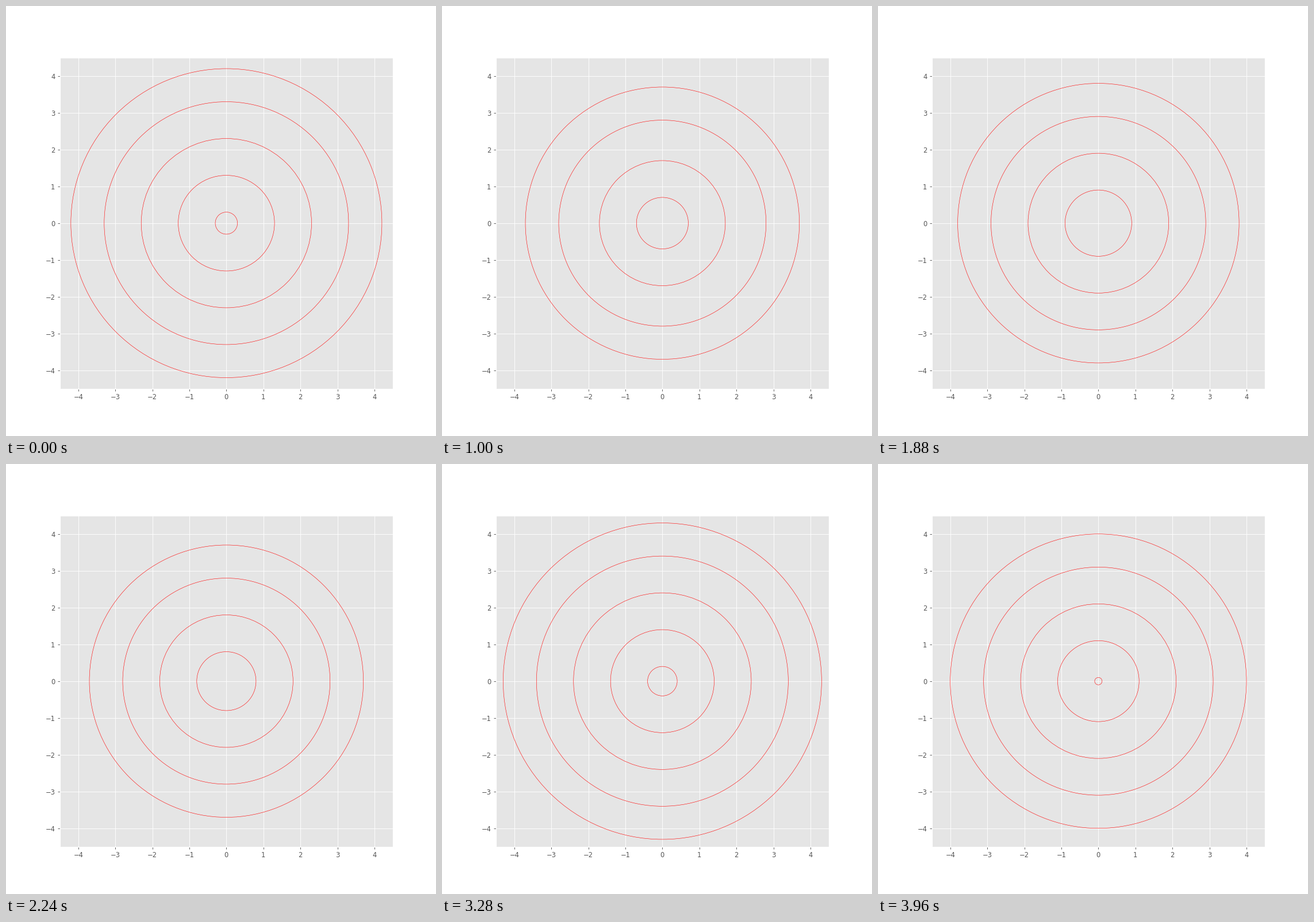
Animation, 748 px wide and 748 px high, one loop 4 s. Source, as a matplotlib script:

```python
import matplotlib.pyplot as plt
from matplotlib.animation import FuncAnimation
from matplotlib.patches import Circle

SIZE = 748
INCHES = 9
FRAMES = 100
LIMIT = 45        # largest radius, in steps of 0.1
PERIOD = 10       # frames between two new rings
LIFE = 47         # age at which a ring is dropped

plt.style.use("ggplot")
plt.rcParams["font.family"] = "DejaVu Sans"

fig = plt.figure(figsize=(INCHES, INCHES), dpi=SIZE / INCHES, facecolor="white")
ax = fig.add_axes([0.125, 0.11, 0.775, 0.77])
ax.set_xlim(-4.5, 4.5)
ax.set_ylim(-4.5, 4.5)
ax.set_xticks(range(-4, 5))
ax.set_yticks(range(-4, 5))

rings = [Circle((0, 0), 0.1, fill=False, edgecolor="red", linewidth=0.5,
                visible=False) for _ in range(6)]
for ring in rings:
    ax.add_patch(ring)


def birth(k):
    """Frame in which ring k has radius zero; older rings are one step ahead."""
    start = PERIOD * k - 2
    return start if k > 0 else start - 1


def radius(k, frame):
    """Radius in steps; a ring rests one frame when the one before it is dropped."""
    rested = frame >= birth(k - 1) + LIFE
    return frame - birth(k) - rested


def update(frame):
    steps = [radius(k, frame) for k in range(-6, FRAMES // PERIOD + 1)]
    shown = [s for s in steps if 0 < s <= LIMIT]
    for i, ring in enumerate(rings):
        ring.set_visible(i < len(shown))
        if i < len(shown):
            ring.set_radius(shown[i] / 10)
    return rings


anim = FuncAnimation(fig, update, frames=FRAMES, interval=40,
                     init_func=lambda: update(0), repeat=True, repeat_delay=0)
plt.show()
```
